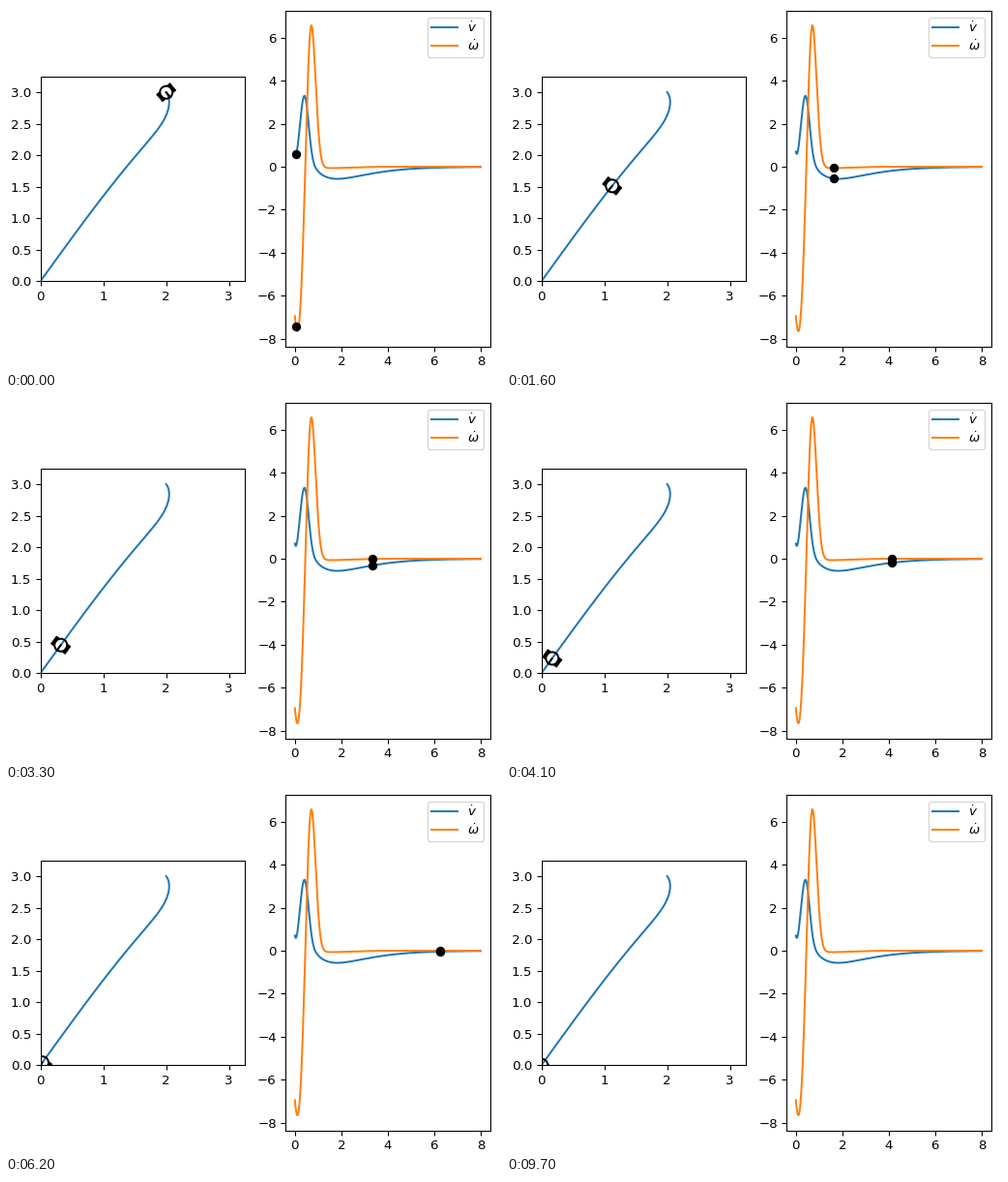
A matplotlib script that plays this animation: 512x376 px, repeating every 10000 ms.

```python
import numpy as np
import matplotlib.pyplot as plt
from matplotlib.animation import FuncAnimation
from matplotlib.patches import Circle, Polygon

W, H, DPI = 512, 376, 96
FRAMES, INTERVAL = 100, 100
START = 2 + 3j
DT = 0.002


def bump(t, height, mid, width):
    return height * np.exp(-((t - mid) / width) ** 2 / 2)


def v_dot(t):
    """Critically damped approach, delayed while the robot turns."""
    return ((2.9 - 3.5 * t) * np.exp(-t)
            + bump(t, 2.4, 0.44, 0.16) - bump(t, 2.25, 0, 0.14))


def w_dot(t):
    """Turn in, brake the turn, then a faint slow correction."""
    return (bump(t, 7.25, 0.685, 0.195) - bump(t, 7.75, 0.12, 0.26)
            - 1.2 * t**5 * np.exp(-3.3 * t))


def integrate(rate):
    """Integral over time that comes to rest at zero at the end."""
    return -np.cumsum(rate[::-1])[::-1] * DT


# motion in the complex plane, turned so that it runs from START to 0
time = np.arange(0, 14, DT)
v = integrate(v_dot(time))
heading = integrate(integrate(w_dot(time)))
pos = integrate(v * np.exp(1j * heading))
turn = START / pos[0]
pos = pos * turn
heading = heading + np.angle(turn)

fig = plt.figure(figsize=(W / DPI, H / DPI), dpi=DPI)


def axes(x, top, w, h):
    return fig.add_axes([x / W, 1 - (top + h) / H, w / W, h / H])


ax = axes(35.6, 72.8, 211.3, 211.5)
ax.set(xlim=(0, 3.25), ylim=(0, 3.25), xticks=range(4),
       yticks=np.arange(0, 3.1, 0.5))
ax.plot(pos.real, pos.imag)

bx = axes(289.2, 5.1, 211.3, 346.8)
ts = np.linspace(0, 8, 800)
bx.plot(ts, v_dot(ts), label=r"$\dot{v}$")
bx.plot(ts, w_dot(ts), label=r"$\dot{\omega}$")
bx.set(xlim=(-0.4, 8.4), ylim=(-8.37, 7.25), xticks=range(0, 9, 2),
       yticks=range(-8, 7, 2))
bx.legend(loc="upper right", labelspacing=0.31, borderpad=0.28)

# robot: round body, heading line and two wheels
RADIUS = 0.1
body = ax.add_patch(Circle((0, 0), RADIUS, fill=False, ec="k", lw=1.5,
                           zorder=2.3))
nose, = ax.plot([], [], "k", lw=1.5, zorder=2.3)
rect = np.array([-1 - 1j, 1 - 1j, 1 + 1j, -1 + 1j])
rect = 0.075 * rect.real + 0.025j * rect.imag
wheels = [ax.add_patch(Polygon([(0, 0)] * 4, fc="k", ec="k", lw=0.5,
                               zorder=2.4)) for _ in range(2)]
dots = [bx.plot([], [], "ko")[0] for _ in range(2)]


def xy(z):
    return np.column_stack([np.real(z), np.imag(z)])


def update(k):
    t = 0.05 + k * INTERVAL / 1000
    i = round(t / DT)
    p, ahead = pos[i], np.exp(1j * heading[i])
    body.center = p.real, p.imag
    nose.set_data(*xy([p, p + RADIUS * ahead]).T)
    for wheel, side in zip(wheels, (-0.115j, 0.115j)):
        wheel.set_xy(xy(p + (rect + side) * ahead))
    for dot, f in zip(dots, (v_dot, w_dot)):
        dot.set_data([t], [f(t)])
    return [body, nose, *wheels, *dots]


anim = FuncAnimation(fig, update, frames=FRAMES, interval=INTERVAL,
                     repeat=True, repeat_delay=0)
plt.show()
```
